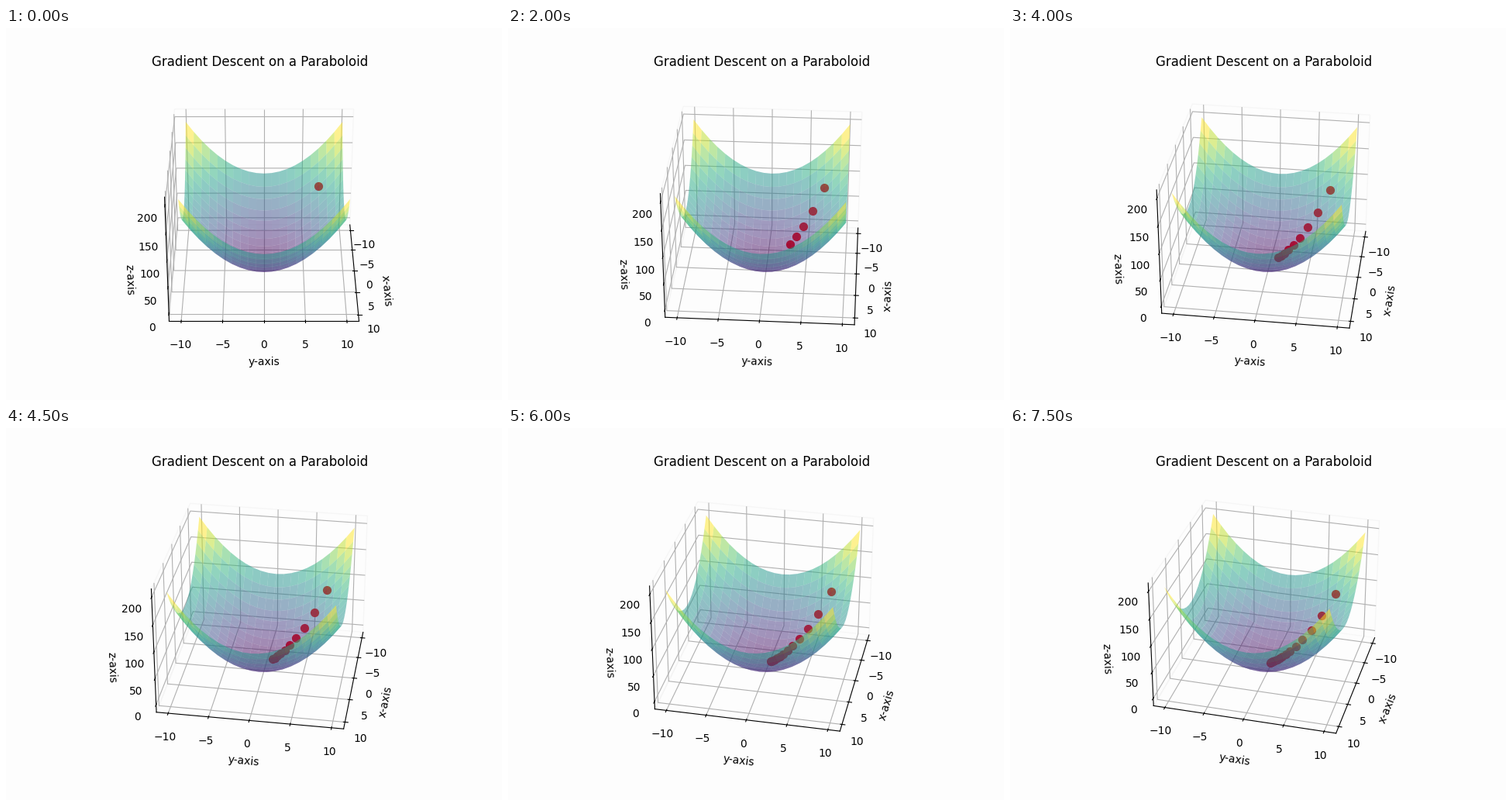
Write a matplotlib script that moves like this. It is 640x480 px and loops after 8 s.

```python
import numpy as np
import matplotlib.pyplot as plt
from matplotlib.animation import FuncAnimation

FRAMES = 16
STEP_MS = 500
RATE = 0.1
START = np.array([-7.0, 7.0])
PAPER = "#fdfdfd"


def bowl(x, y):
    return x**2 + y**2


def descend(k):
    """Position after k gradient steps; each one shrinks x and y by 1 - 2*RATE."""
    return START * (1 - 2 * RATE) ** k


def padded(low, high):
    """Data range with a 5 % margin and the usual 1/48 view padding."""
    for share in (0.05, 1 / 48):
        pad = (high - low) * share
        low, high = low - pad, high + pad
    return low, high


fig = plt.figure(figsize=(6.4, 4.8), dpi=100, facecolor=PAPER)
ax = fig.add_subplot(projection="3d", facecolor=PAPER)

grid = np.linspace(-10, 10, 21)
X, Y = np.meshgrid(grid, grid)
ax.plot_surface(X, Y, bowl(X, Y), cmap="viridis", alpha=0.5, linewidth=0)

dots = []
for k in range(FRAMES):
    x, y = descend(k)
    dots.append(ax.scatter(x, y, bowl(x, y), color="red", s=50))

ax.set(
    title="Gradient Descent on a Paraboloid",
    xlabel="x-axis", ylabel="y-axis", zlabel="z-axis",
    xlim=padded(-10, 10), ylim=padded(-10, 10), zlim=padded(0, 200),
    xticks=range(-10, 11, 5), yticks=range(-10, 11, 5), zticks=range(0, 201, 50),
)
for axis in (ax.xaxis, ax.yaxis, ax.zaxis):
    axis.pane.set_facecolor(PAPER)
    axis.pane.set_edgecolor("#f0f0f0")


def draw(i):
    ax.view_init(elev=30, azim=i)
    for k, dot in enumerate(dots):
        dot.set_visible(k <= i)
    return dots


anim = FuncAnimation(fig, draw, frames=FRAMES, interval=STEP_MS,
                     repeat=True, repeat_delay=0, blit=False)
plt.show()
```
